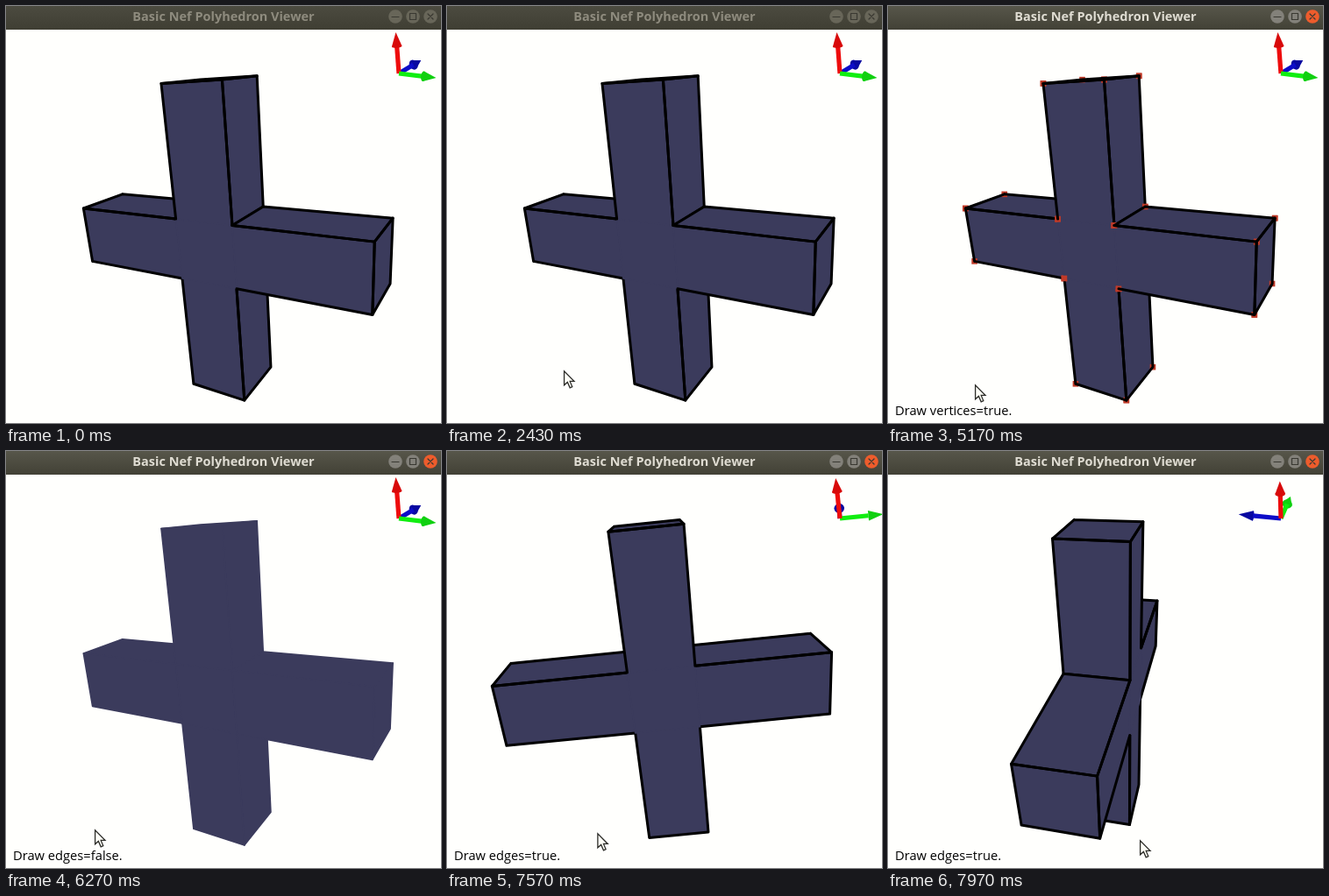
Write an HTML page with a canvas that moves like this. It is 496 px wide and 476 px high and loops after 8000 ms.

```html
<!DOCTYPE html>
<html lang="en">
<head>
<meta charset="utf-8">
<title>Polyhedron viewer</title>
<style>
  html, body { margin: 0; width: 100%; height: 100%; overflow: hidden; background: #fffffd; }
  canvas { display: block; }
</style>
</head>
<body>
<canvas id="stage" width="496" height="476"></canvas>
<script>
const ctx = document.getElementById('stage').getContext('2d');
const LOOP = 8000, FOCUS_AT = 3530, DRAG_AT = 7230;
const FOCAL = 543, VIEW = { x: 248, y: 252 };
const CENTER = [-0.013, -0.253, -7.62];        // camera space: x right, y up, z to the viewer
const GIZMO = { x: 448, y: 77, length: 49.5 };
const FACE = '#3b3b5c';

// Camera-space directions of the solid's x and y axes.
const POSES = [
  { x: [0.858, -0.101, 0.505], y: [-0.068, 0.947, 0.313] },
  { x: [0.995, 0.098, 0.014], y: [-0.096, 0.936, 0.355] },
  { x: [0.221, 0.506, -0.834], y: [-0.024, 0.857, 0.514] }
];
const DRAG_PATH = [[101, 432], [171, 436], [287, 444]];

const POINTER_PATH = [
  [1380, 497, 300], [1700, 293, 368], [2050, 109, 427], [2430, 133, 416],
  [2670, 133, 416], [2850, 140, 415], [3070, 128, 419], [3530, 128, 420],
  [3900, 128, 420], [4330, 112, 427], [5170, 99, 432], [6000, 101, 432]
];

const MESSAGES = [
  [4200, 'Draw vertices=true.'], [5400, 'Draw vertices=false.'],
  [5800, 'Draw edges=false.'], [6500, 'Draw edges=true.']
];

const mix = (a, b, k) => a.map((v, i) => v + (b[i] - v) * k);
const dot = (a, b) => a.reduce((sum, v, i) => sum + v * b[i], 0);
const unit = v => v.map(c => c / Math.hypot(...v));
const cross = (a, b) => [
  a[1] * b[2] - a[2] * b[1], a[2] * b[0] - a[0] * b[2], a[0] * b[1] - a[1] * b[0]
];
const between = (t, from, to) => t >= from && t < to;

// 0 at rest, 1 at the middle pose, 2 at the last one.
function dragProgress(t) {
  const s = Math.max(0, t - DRAG_AT);
  return s < 340 ? (s / 340) ** 2 : Math.min(2, 1 + (s - 340) / 400);
}

function blendStops(stops, progress, blend) {
  const i = Math.min(stops.length - 2, Math.floor(progress));
  return blend(stops[i], stops[i + 1], progress - i);
}

function axesAt(t) {
  return blendStops(POSES, dragProgress(t), (p, q, k) => {
    const x = unit(mix(p.x, q.x, k));
    const z = unit(cross(x, mix(p.y, q.y, k)));
    return [x, cross(z, x), z];
  });
}

// The solid is a unit cube with four arms, each two units long.
function makeBox(axis, sign) {
  const box = { axis, sign, lo: [-0.5, -0.5, -0.5], hi: [0.5, 0.5, 0.5] };
  if (sign) {
    box.lo[axis] = sign > 0 ? 0.5 : -2.5;
    box.hi[axis] = sign > 0 ? 2.5 : -0.5;
  }
  return box;
}
const BOXES = [makeBox(0, 0), makeBox(0, 1), makeBox(0, -1), makeBox(1, 1), makeBox(1, -1)];

function project(p, axes) {
  const [x, y, z] = CENTER.map((c, i) => c + dot(p, axes.map(a => a[i])));
  return [VIEW.x - FOCAL * x / z, VIEW.y + FOCAL * y / z];
}

function visibleFaces(box, eye) {
  const faces = [];
  for (let k = 0; k < 3; k++) {
    for (const side of [-1, 1]) {
      const inner = box.sign ? k === box.axis && side === -box.sign : k < 2;
      const level = side > 0 ? box.hi[k] : box.lo[k];
      if (inner || side * (eye[k] - level) <= 0) continue;
      const i = (k + 1) % 3, j = (k + 2) % 3;
      const corners = [['lo', 'lo'], ['hi', 'lo'], ['hi', 'hi'], ['lo', 'hi']].map(([u, v]) => {
        const p = [];
        p[k] = level; p[i] = box[u][i]; p[j] = box[v][j];
        return p;
      });
      faces.push({ corners, flat: k === 2 });
    }
  }
  return faces;
}

function tracePath(points) {
  ctx.beginPath();
  points.forEach(p => ctx.lineTo(...p));
  ctx.closePath();
}

function drawSolid(axes, showEdges, showVertices) {
  const eye = axes.map(a => -dot(a, CENTER));
  const rank = b => b.sign ? b.sign * eye[b.axis] : 0.5;
  const ordered = [...BOXES].sort((a, b) => rank(a) - rank(b));
  ctx.lineCap = ctx.lineJoin = 'round';
  for (const box of ordered) {
    const faces = visibleFaces(box, eye);
    for (const face of faces) {
      face.points = face.corners.map(p => project(p, axes));
      tracePath(face.points);
      ctx.fillStyle = ctx.strokeStyle = FACE;
      ctx.lineWidth = 1.6;
      ctx.fill();
      ctx.stroke();
    }
    if (showVertices) {
      ctx.fillStyle = '#c03a28';
      for (const [x, y] of faces.flatMap(f => f.points)) ctx.fillRect(x - 3.3, y - 3.3, 6.6, 6.6);
    }
    const onBase = p => p[box.axis] === box.sign * 0.5;
    for (const { corners, points, flat } of faces) {
      if (!showEdges || !box.sign) continue;
      ctx.beginPath();
      corners.forEach((p, i) => {
        const n = (i + 1) % 4;
        if (flat && onBase(p) && onBase(corners[n])) return;
        ctx.moveTo(...points[i]);
        ctx.lineTo(...points[n]);
      });
      ctx.strokeStyle = '#000';
      ctx.lineWidth = 3;
      ctx.stroke();
    }
  }
}

function drawArrow([x, y, z], shaft, head) {
  const reach = Math.hypot(x, y) * GIZMO.length, base = reach * 0.66;
  ctx.save();
  ctx.translate(GIZMO.x, GIZMO.y);
  ctx.rotate(Math.atan2(-y, x));
  const drawShaft = () => {
    ctx.fillStyle = shaft;
    ctx.fillRect(0, -2.6, base, 5.2);
  };
  if (z >= 0) drawShaft();
  ctx.fillStyle = head;
  tracePath([[base, -5.8], [reach, 0], [base, 5.8]]);
  ctx.fill();
  ctx.beginPath();
  ctx.ellipse(base, 0, 5.8 * Math.abs(z), 5.8, 0, 0, Math.PI * 2);
  ctx.fill();
  if (z < 0) drawShaft();
  ctx.restore();
}

function drawGizmo([x, y, z]) {
  [
    [y, '#ee0c0c', '#d80a0a'],
    [x, '#10ee10', '#10d010'],
    [z.map(c => -c), '#0c0cc8', '#0808a0']
  ].sort((p, q) => p[0][2] - q[0][2]).forEach(arrow => drawArrow(...arrow));
}

function drawButton(x, fill, mark) {
  ctx.beginPath();
  ctx.arc(x, 12, 7.8, 0, Math.PI * 2);
  ctx.fillStyle = fill;
  ctx.fill();
  ctx.strokeStyle = '#3a3932';
  ctx.lineWidth = 1.2;
  ctx.beginPath();
  mark(x);
  ctx.stroke();
}

function drawTitleBar(active) {
  const shade = ctx.createLinearGradient(0, 0, 0, 27);
  shade.addColorStop(0, active ? '#57564a' : '#4c4b40');
  shade.addColorStop(1, active ? '#424136' : '#3f3e33');
  ctx.fillStyle = shade;
  ctx.fillRect(0, 0, 496, 27);
  ctx.font = '700 14.5px "Open Sans", sans-serif';
  ctx.textAlign = 'center';
  ctx.fillStyle = active ? '#dfdcd2' : '#8e8b7e';
  ctx.fillText('Basic Nef Polyhedron Viewer', 248, 17);
  const grey = active ? '#83817a' : '#686659';
  drawButton(444, grey, x => { ctx.moveTo(x - 4, 12.5); ctx.lineTo(x + 4, 12.5); });
  drawButton(464, grey, x => ctx.rect(x - 3.5, 8.5, 7, 7));
  drawButton(484, active ? '#ee5c2c' : grey, x => {
    ctx.moveTo(x - 3, 9); ctx.lineTo(x + 3, 15);
    ctx.moveTo(x + 3, 9); ctx.lineTo(x - 3, 15);
  });
}

function pointerAt(t) {
  if (t >= DRAG_AT) return blendStops(DRAG_PATH, dragProgress(t), mix);
  const next = POINTER_PATH.findIndex(key => key[0] > t);
  if (next === 0) return null;
  if (next < 0) return POINTER_PATH.at(-1).slice(1);
  const [from, to] = [POINTER_PATH[next - 1], POINTER_PATH[next]];
  return mix(from, to, (t - from[0]) / (to[0] - from[0])).slice(1);
}

function drawPointer(position) {
  if (!position) return;
  ctx.save();
  ctx.translate(position[0] + 0.6, position[1] + 0.8);
  ctx.lineJoin = 'miter';
  tracePath([[0, 0], [0, 16], [3.8, 12.6], [6.6, 19], [9.2, 17.8], [6.6, 11.6], [11.4, 11.6]]);
  ctx.fillStyle = '#fffff8';
  ctx.fill();
  ctx.strokeStyle = '#2c2c28';
  ctx.lineWidth = 1.3;
  ctx.stroke();
  ctx.restore();
}

function drawMessage(t) {
  const current = MESSAGES.filter(m => m[0] <= t).pop();
  if (!current) return;
  ctx.font = '14.7px "Open Sans", sans-serif';
  ctx.textAlign = 'left';
  ctx.fillStyle = '#000';
  ctx.fillText(current[1], 8, 467);
}

function render(t) {
  ctx.fillStyle = '#fffffd';
  ctx.fillRect(0, 0, 496, 476);
  const axes = axesAt(t);
  drawSolid(axes, !between(t, 5800, 6500), between(t, 4200, 5400));
  drawGizmo(axes);
  drawMessage(t);
  drawTitleBar(t >= FOCUS_AT);
  drawPointer(pointerAt(t));
}

const start = performance.now();
function tick() {
  render((performance.now() - start) % LOOP);
  requestAnimationFrame(tick);
}
tick();
</script>
</body>
</html>
```
